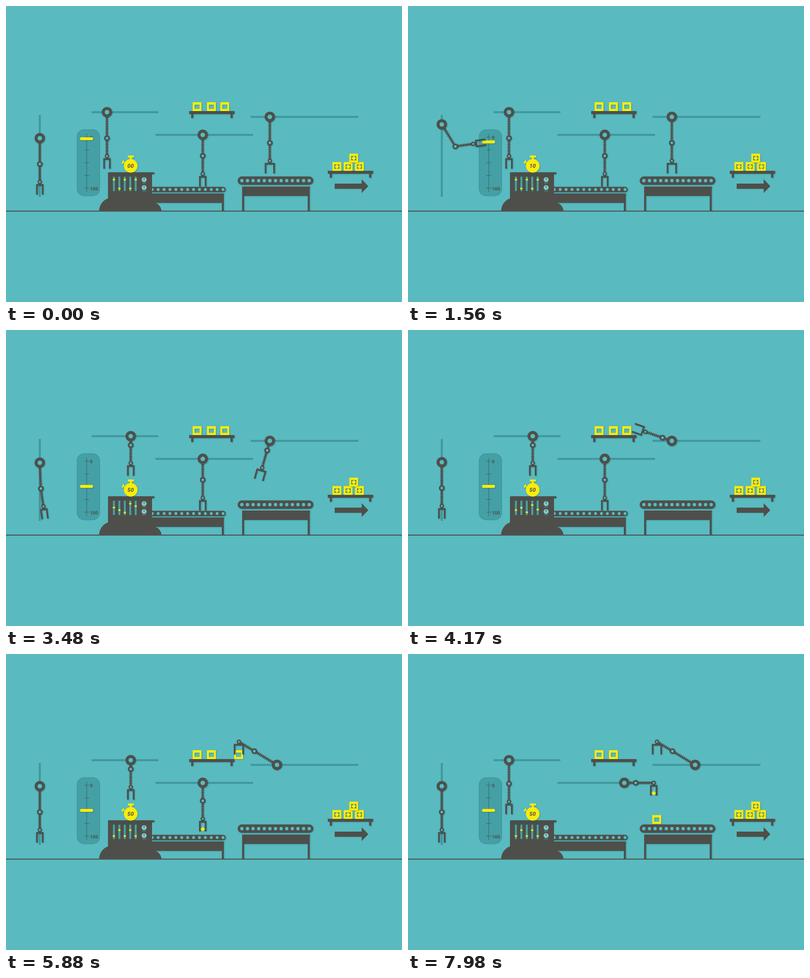
Write an HTML page with a canvas that moves like this. It is 800 by 600 pixels and loops after 8 s.

```html
<!DOCTYPE html>
<html lang="en">
<head>
<meta charset="utf-8">
<title>Assembly line</title>
<style>
  html, body { margin: 0; width: 100%; height: 100%; overflow: hidden; background: #59bac0; }
  canvas { display: block; }
</style>
</head>
<body>
<canvas id="stage" width="800" height="600"></canvas>
<script>
const ctx = document.getElementById('stage').getContext('2d');
const LOOP = 8000;
const TEAL = '#59bac0', DARK = '#4e4f4a', YELLOW = '#f9ec0b', RAIL = '#3f979c', PANEL = '#44a0a4';
const FLOOR = 415;

let time = 0;

const clamp = p => Math.min(1, Math.max(0, p));
// Progress 0..1 of the current time between start and end, straight or eased.
const linear = (start, end) => clamp((time - start) / (end - start));
function ramp(start, end) {
  const p = linear(start, end);
  return p < .5 ? 2 * p * p : 1 - 2 * (1 - p) ** 2;
}
const mix = (a, b, p) => a + (b - a) * p;
const rad = deg => deg * Math.PI / 180;
// Angles are measured from straight down, positive towards the right.
const reach = ([x, y], deg, length) => [x + Math.sin(rad(deg)) * length, y + Math.cos(rad(deg)) * length];

function shadow(on) {
  ctx.shadowColor = on ? 'rgba(20,85,90,.4)' : 'transparent';
  ctx.shadowBlur = on ? 2 : 0;
  ctx.shadowOffsetX = ctx.shadowOffsetY = on ? 1 : 0;
}
function flat(draw) { shadow(false); draw(); shadow(true); }

function rect(x, y, w, h, color = DARK, radius = 0) {
  ctx.fillStyle = color;
  ctx.beginPath();
  ctx.roundRect(x, y, w, h, radius);
  ctx.fill();
}
function disc(x, y, r, color = DARK) {
  ctx.fillStyle = color;
  ctx.beginPath();
  ctx.arc(x, y, r, 0, 7);
  ctx.fill();
}
function line(points, width, color = DARK, dash = []) {
  ctx.strokeStyle = color;
  ctx.lineWidth = width;
  ctx.setLineDash(dash);
  ctx.beginPath();
  points.forEach(p => ctx.lineTo(...p));
  ctx.stroke();
}
function label(text, x, y, font, align) {
  ctx.font = font + ' Roboto, sans-serif';
  ctx.textAlign = align;
  ctx.fillStyle = DARK;
  ctx.fillText(text, x, y);
}
function ring([x, y], r) {
  disc(x, y, r);
  flat(() => disc(x, y, r * .43, TEAL));
}
function diamond(x, y) {
  ctx.save();
  ctx.translate(x, y);
  ctx.rotate(rad(45));
  rect(-3.3, -3.3, 6.6, 6.6, YELLOW);
  ctx.restore();
}
function box(x, y, filled) {
  ctx.fillStyle = YELLOW;
  ctx.beginPath();
  ctx.rect(x - 9, y - 9, 18, 18);
  ctx.rect(x - 5, y - 4, 10, 8.5);
  ctx.fill('evenodd');
  if (filled) flat(() => {
    rect(x - 5, y - 4, 10, 8.5, '#56867a');
    diamond(x, y + .3);
  });
}

function claw(wrist, deg, half, flare) {
  ctx.save();
  ctx.translate(...wrist);
  ctx.rotate(-rad(deg));
  line([[0, 3], [0, 6]], 4);
  line([[-half - flare, 25.5], [-half, 6], [half, 6], [half + flare, 25.5]], 3.5);
  ctx.restore();
}

// Two ribbed segments and a claw; returns the wrist position.
function arm({ base, upper = 0, fore = upper, grip = fore, length, half = 5.8, flare = 0 }) {
  const elbow = reach(base, upper, length);
  const wrist = reach(elbow, fore, 36.5);
  flat(() => {
    line([base, elbow, wrist], 2.6);
    line([base, elbow, wrist], 6.4, DARK, [2, 1.6]);
  });
  claw(wrist, grip, half, flare);
  ring(base, 10.6);
  ring(elbow, 5.9);
  ring(wrist, 4.5);
  return wrist;
}

function shelf(x, y) {
  rect(x, y, 91.5, 6);
  for (const leg of [4, 83.5]) rect(x + leg, y + 5, 4.5, 9);
}
function belt(x, y, width, height) {
  rect(x, y, width, height, DARK, height / 2);
  const step = (width - height) / 12;
  flat(() => {
    for (let i = 0; i < 13; i++) disc(x + height / 2 + i * step, y + height / 2, 2 + height / 12, TEAL);
  });
}
function table(x, y, width) {
  rect(x, y, width, 3);
  rect(x + 3, y, width - 6, 19);
  for (const leg of [x, x + width - 4]) rect(leg, y, 4, FLOOR - y);
}

function scenery() {
  flat(() => {
    rect(0, FLOOR - .3, 800, 2);
    line([[68.3, 221], [68.3, 387]], 4, RAIL);
    line([[173, 215.3], [308, 215.3]], 4, RAIL);
    line([[302, 261.3], [499, 261.3]], 4, RAIL);
    line([[494, 224.7], [712, 224.7]], 4, RAIL);
  });

  shelf(370, 213);
  shelf(650, 334);
  box(386, 204);
  box(415, 204);
  for (let i = 0; i < 3; i++) box(668.5 + i * 22.8, 325.3, true);
  box(702.5, 308.3, true);

  flat(() => {
    rect(664, 360, 55, 10.7);
    ctx.beginPath();
    ctx.moveTo(718.5, 351);
    ctx.lineTo(732, 365.3);
    ctx.lineTo(718.5, 379);
    ctx.fill();
  });

  belt(290, 366.5, 154, 11);
  table(280, 380, 160);
  belt(468, 345.5, 153, 17);
  table(477, 366, 136.5);
}

function gauge(knobY) {
  flat(() => {
    rect(143, 250, 47, 135.5, '#3d999e', 15);
    rect(144.5, 251.5, 44, 132.5, PANEL, 14);
    line([[163, 259], [163, 377]], 1, '#34666a');
    for (let y = 266; y < 375; y += 25.8) line([[158, y], [168, y]], 1, '#34666a');
    label('0', 169.5, 269.8, 'bold condensed 9.5px', 'left');
    label('100', 169.5, 373.5, 'bold condensed 9.5px', 'left');
  });
  rect(149.5, knobY - 3, 26.5, 6, YELLOW, 3);
}

function machine() {
  flat(() => {
    ctx.fillStyle = DARK;
    ctx.beginPath();
    ctx.ellipse(215, 416, 27, 27.5, 0, Math.PI, Math.PI * 1.5);
    ctx.ellipse(297, 416, 17, 17.5, 0, Math.PI * 1.5, Math.PI * 2);
    ctx.fill();
    rect(206, 338, 89, 65);

    // Each mixer knob alternates, spreads out, then settles the other way round.
    for (let i = 0; i < 5; i++) {
      const x = 218 + i * 11, side = i % 2 ? -1 : 1;
      const spread = mix(361 - 9 * side, 352 + (8 + 5 * i) % 23, ramp(1550, 3400));
      const level = mix(spread, 363 + 6 * side, ramp(3550, 4700));
      rect(x - 2, 346, 4, 29, PANEL);
      rect(x - 2.3, level - 1.5, 4.6, 3, YELLOW);
    }
    for (const y of [352, 368]) {
      disc(279, y, 5, '#84cbcb');
      line([[279, y - 4], [279, y + 1]], 1.2);
      rect(275, y + 6.3, 8, 1, PANEL);
    }
  });
  rect(206, 337, 94, 4, DARK, 2);
}

function stopwatch(count, press) {
  const top = 303 + press * 3;
  rect(246, top, 12.5, 4.2, YELLOW, 1);
  rect(250, top + 3, 4.5, 6, YELLOW);
  ctx.save();
  ctx.translate(252, 324);
  ctx.rotate(rad(-64));
  rect(-2, -17, 4, 5, YELLOW);
  rect(-3.5, -19, 7, 3, YELLOW, 1);
  ctx.restore();
  disc(252, 324, 13.8, YELLOW);
  flat(() => label(String(count).padStart(2, '0'), 251.7, 328.2, 'italic bold condensed 11.5px', 'center'));
}

function gaugeArm(knobY) {
  const out = ramp(200, 1200) - ramp(2500, 3725);
  arm({ base: [68.3, mix(268, knobY - 35.5, out)], upper: 31.5 * out, fore: 98 * out, length: 52.3 });
}

function stopwatchArm(press) {
  const travel = ramp(2500, 3400) - ramp(6000, 7200);
  arm({
    base: [204 + 48 * travel, 215.3],
    length: 52.5 - 5 * ramp(6000, 7000) - 34.5 * travel + 10 * press,
    flare: 3 * (ramp(5250, 5600) - ramp(4200, 4450))
  });
}

// The diamond rides the belt until the claw lifts it.
function partArm() {
  const swing = 90 * ramp(6200, 6900);
  const grip = swing * (1 - ramp(7300, 7800));
  const wrist = arm({
    base: [397.5 + 39.5 * ramp(7000, 7600), 261.2],
    upper: swing,
    grip,
    length: 42.5 - 24.5 * ramp(5650, 6300) + 6 * ramp(7700, 8100)
  });
  if (time > 5650) diamond(...reach(wrist, grip, 21));
}

function boxArm() {
  const carry = 60.5 * ramp(5400, 6400);
  box(442 + carry, 204 + 131.5 * linear(6800, 7290) ** 2);
  const swing = -121.3 * ramp(3140, 4470);
  arm({
    base: [533 - 13.5 * ramp(4800, 5150) + carry, 224.8],
    upper: swing,
    grip: swing * (1 - ramp(4450, 4850)),
    length: 52.5 - 32.5 * ramp(2600, 3200) + 33.7 * ramp(4200, 4650),
    half: 8.6,
    flare: 2.8 * (ramp(4500, 4800) - ramp(5150, 5350) + ramp(6650, 6850) - ramp(7100, 7500))
  });
}

function draw() {
  shadow(false);
  rect(0, 0, 800, 600, TEAL);
  shadow(true);
  scenery();

  const pull = ramp(1300, 2300);
  const press = ramp(4450, 4750) - ramp(5150, 5500);
  const knobY = 269 + 48 * pull;
  if (time <= 5650) diamond(290 + 108 * linear(4650, 5600), 362.7);
  gauge(knobY);
  machine();
  stopwatch(Math.ceil(pull * 5) * 10, press);
  gaugeArm(knobY);
  stopwatchArm(press);
  partArm();
  boxArm();
}

function frame() {
  time = performance.now() % LOOP;
  draw();
  requestAnimationFrame(frame);
}
frame();
</script>
</body>
</html>
```
